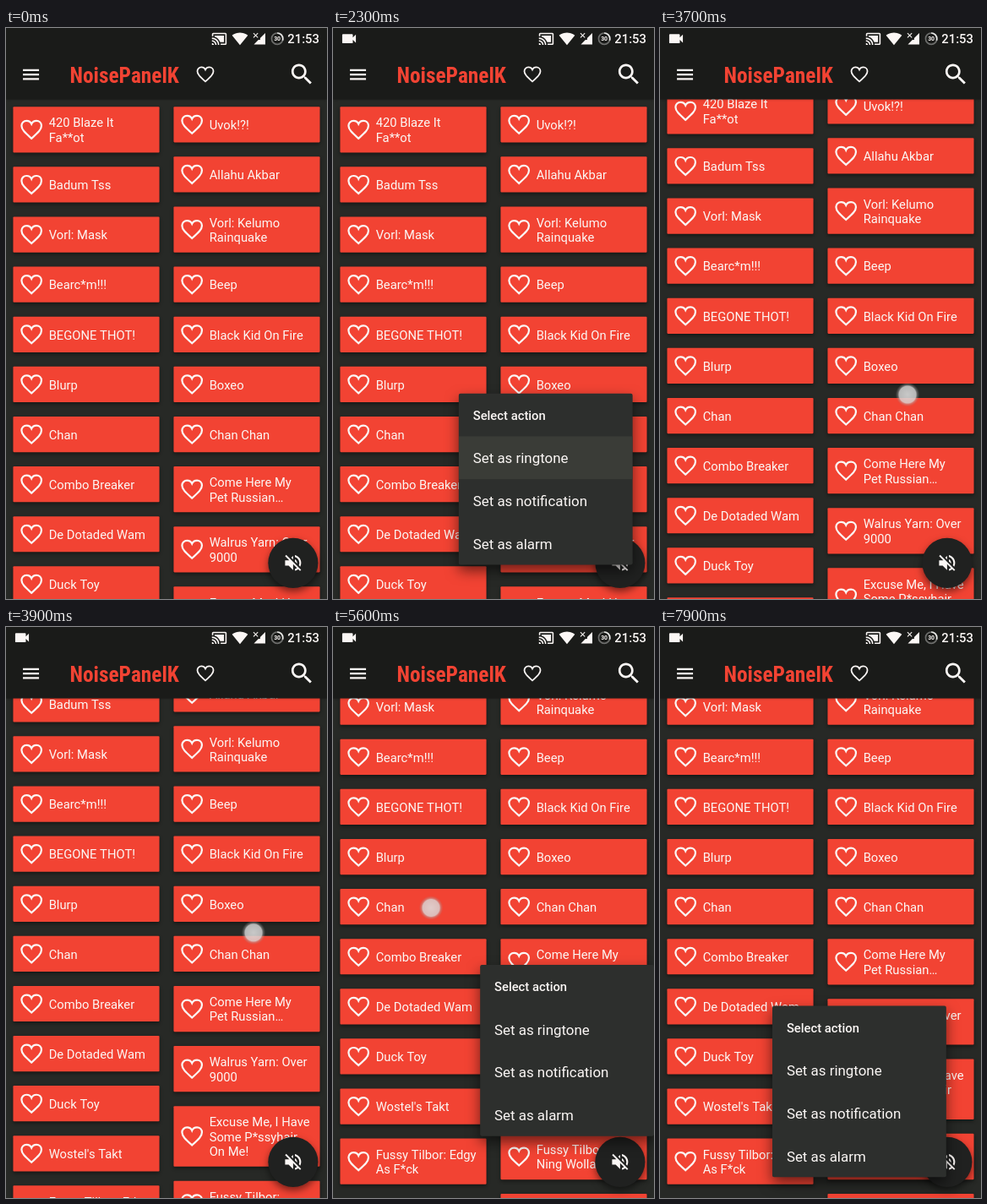
Animation of 380 by 676 pixels, one loop 8 s. Source, as an HTML page with a canvas:

```html
<!DOCTYPE html>
<html lang="en">
<head>
<meta charset="utf-8">
<title>Sound board</title>
<style>
  html, body { margin: 0; width: 100%; height: 100%; overflow: hidden; background: #272926; }
  canvas { display: block; width: 380px; height: 676px; }
</style>
</head>
<body>
<canvas id="stage"></canvas>
<script>
const LOOP = 8000, STEP = 100;
const UNIT = 380 / 360; // the layout is 360 units wide
const canvas = document.getElementById('stage');
const ctx = canvas.getContext('2d');
const ratio = window.devicePixelRatio || 1;
canvas.width = 380 * ratio;
canvas.height = 676 * ratio;

const SANS = 'Roboto, "Noto Sans", sans-serif';
const RED = '#f24333', WHITE = '#fbf7f5', BAR = '#1a1b19', PAGE = '#272926';
const MENU = '#2d2f2d', MENU_PRESSED = '#3a3c37';

// Icons on a 24 x 24 grid
const ICON = {
  heart: 'M12 20C6 14.6 3 11.9 3 8.5 3 5.9 5 4 7.5 4 9.3 4 11.2 5 12 6.8 12.8 5 14.7 4 16.5 4 19 4 21 5.9 21 8.5 21 11.9 18 14.6 12 20z',
  bars: 'M3 18h18v-2H3zm0-5h18v-2H3zm0-7v2h18V6z',
  search: 'M15.5 14h-.79l-.28-.27C15.41 12.59 16 11.11 16 9.5 16 5.91 13.09 3 9.5 3S3 5.91 3 9.5 5.91 16 9.5 16c1.61 0 3.09-.59 4.23-1.57l.27.28v.79l5 4.99L20.49 19zm-6 0C7.01 14 5 11.99 5 9.5S7.01 5 9.5 5 14 7.01 14 9.5 11.99 14 9.5 14z',
  mute: 'M16.5 12c0-1.77-1.02-3.29-2.5-4.03v2.21l2.45 2.45c.03-.2.05-.41.05-.63zm2.5 0c0 .94-.2 1.82-.54 2.64l1.51 1.51C20.63 14.91 21 13.5 21 12c0-4.28-2.99-7.86-7-8.77v2.06c2.89.86 5 3.54 5 6.71zM4.27 3L3 4.27 7.73 9H3v6h4l5 5v-6.73l4.25 4.25c-.67.52-1.42.93-2.25 1.18v2.06c1.38-.31 2.63-.95 3.69-1.81L19.73 21 21 19.73l-9-9zM12 4L9.91 6.09 12 8.18z',
  cast: 'M21 3H3c-1.1 0-2 .9-2 2v3h2V5h18v14h-7v2h7c1.1 0 2-.9 2-2V5c0-1.1-.9-2-2-2zM1 18v3h3c0-1.66-1.34-3-3-3zm0-4v2c2.76 0 5 2.24 5 5h2c0-3.87-3.13-7-7-7zm0-4v2c4.97 0 9 4.03 9 9h2c0-6.08-4.93-11-11-11zM19 7H5v1.63c3.96 1.28 7.09 4.41 8.37 8.37H19z',
  wifi: 'M12 21.5L23.64 7c-.45-.34-4.93-4-11.64-4C5.28 3 .81 6.66.36 7z',
  signal: 'M2 22h20V2L13 11v3H10z',
  camera: 'M17 10.5V7c0-.55-.45-1-1-1H4c-.55 0-1 .45-1 1v10c0 .55.45 1 1 1h12c.55 0 1-.45 1-1v-3.5l4 4v-11z'
};
for (const name in ICON) ICON[name] = new Path2D(ICON[name]);

const COLUMNS = [
  { x: 8, sounds: ['420 Blaze It\nFa**ot', 'Badum Tss', 'Vorl: Mask', 'Bearc*m!!!', 'BEGONE THOT!', 'Blurp', 'Chan',
    'Combo Breaker', 'De Dotaded Wam', 'Duck Toy', "Wostel's Takt", 'Fussy Tilbor: Edgy\nAs F*ck'] },
  { x: 188, sounds: ['Uvok!?!', 'Allahu Akbar', 'Vorl: Kelumo\nRainquake', 'Beep', 'Black Kid On Fire', 'Boxeo', 'Chan Chan',
    'Come Here My\nPet Russian…', 'Walrus Yarn: Over\n9000', 'Excuse Me, I Have\nSome P*ssyhair\nOn Me!',
    'Fussy Tilbor:\nNing Wollam', 'Gong'] }
];

// Context menus grow out of the finger position (fx, fy)
const MENU_W = 195, MENU_H = 192, ROW = 48;
const MENUS = [
  { open: 1032, close: 2800, x: 141, y: 410, fx: 141, fy: 410, pressAt: 1900 },
  { open: 4678, close: 5900, x: 165, y: 379, fx: 293.7, fy: 379 },
  { open: 7230, close: 9000, x: 126, y: 425, fx: 126, fy: 425 }
];
const TOUCHES = [
  { from: 500, to: 1700, x: 141, y: 410 },
  { from: 2000, to: 2300, x: 215, y: 484 },
  { from: 3600, to: 4150, x: 277.6, y: 432, drags: true },
  { from: 4200, to: 5300, x: 293.7, y: 379 },
  { from: 5600, to: 5900, x: 110, y: 315 },
  { from: 6800, to: 7900, x: 126, y: 425 }
];

const clamp = v => Math.max(0, Math.min(1, v));
const mix = (a, b, k) => a + (b - a) * k;
const smooth = v => v * v * (3 - 2 * v);

// cubic-bezier(x1, 0, .2, 1)
function settle(u, x1) {
  let low = 0, high = 1, s = u;
  for (let i = 0; i < 20; i++) {
    s = (low + high) / 2;
    const x = 3 * x1 * s * (1 - s) ** 2 + 0.6 * s * s * (1 - s) + s ** 3;
    if (x < u) low = s; else high = s;
  }
  return smooth(s);
}

function icon(name, x, y, scale = 1) {
  ctx.save();
  ctx.translate(x, y);
  ctx.scale(scale, scale);
  ctx.translate(-12, -12);
  if (name === 'heart') {
    ctx.lineWidth = 1.7;
    ctx.strokeStyle = WHITE;
    ctx.stroke(ICON.heart);
  } else {
    ctx.fillStyle = WHITE;
    ctx.fill(ICON[name]);
  }
  ctx.restore();
}

// Text whose padded line box is centred on y
function text(label, x, y, size, { weight = '400', color = WHITE, family = SANS, align = 'left' } = {}) {
  ctx.font = `${weight} ${size}px ${family}`;
  ctx.fillStyle = color;
  ctx.textAlign = align;
  ctx.fillText(label, x, y + size * 0.392);
}

function shadowed(blur, drop, alpha, color, trace) {
  ctx.save();
  ctx.shadowColor = `rgba(0,0,0,${alpha})`;
  ctx.shadowBlur = blur * ratio;
  ctx.shadowOffsetY = drop * ratio;
  ctx.fillStyle = color;
  ctx.beginPath();
  trace();
  ctx.fill();
  ctx.restore();
}

function drawCards(scroll) {
  for (const { x, sounds } of COLUMNS) {
    let y = 88.3 - scroll;
    for (const sound of sounds) {
      const lines = sound.split('\n');
      const height = Math.max(40, 18.6 + 16.4 * lines.length);
      const middle = y + height / 2;
      shadowed(4, 2, 0.45, RED, () => ctx.roundRect(x, y, 164, height, 1));
      icon('heart', x + 20.6, middle, 1.24);
      lines.forEach((line, i) =>
        text(line, x + 40, middle + (i - (lines.length - 1) / 2) * 16.4, 14));
      y += height + 16;
    }
  }
}

function drawBars(t) {
  shadowed(3, 1, 0.3, BAR, () => ctx.rect(0, 0, 360, 80));
  if (t >= 100) icon('camera', 18, 12, 0.85);
  icon('cast', 239.2, 12.2, 0.75);
  icon('wifi', 262.4, 12, 0.76);
  icon('signal', 284.4, 12, 0.64);
  ctx.lineWidth = 1;
  ctx.strokeStyle = WHITE;
  ctx.beginPath();
  ctx.moveTo(277.5, 5.7); ctx.lineTo(282.5, 10.7);
  ctx.moveTo(282.5, 5.7); ctx.lineTo(277.5, 10.7);
  ctx.stroke();

  ctx.lineWidth = 1.6;
  for (const [color, sweep] of [['#6d6e6c', 1], ['#e6e6e4', 0.3]]) {
    ctx.strokeStyle = color;
    ctx.beginPath();
    ctx.arc(304.2, 12, 6.3, -Math.PI / 2, Math.PI * (2 * sweep - 0.5));
    ctx.stroke();
  }
  text('30', 304.2, 11.7, 6.5, { weight: '700', align: 'center' });
  text('21:53', 315.8, 11.7, 14, { weight: '500' });

  icon('bars', 28, 52.2);
  text('NoisePanelK', 71.5, 52, 24,
    { weight: 'bold condensed', color: RED, family: '"Roboto Condensed", Roboto, sans-serif' });
  icon('heart', 223.6, 52);
  icon('search', 331.8, 52, 1.3);
}

function drawMuteButton() {
  shadowed(9, 4, 0.5, '#202120', () => ctx.arc(322, 600, 28, 0, 7));
  icon('mute', 322, 600);
}

function drawMenu(menu, t) {
  if (t < menu.open || t >= menu.close) return;
  const u = clamp((t - menu.open) / 170);
  const kx = settle(u, 0), ky = settle(u, 0.4);
  const cx = mix(menu.fx, menu.x + MENU_W / 2, kx);
  const cy = mix(menu.fy, menu.y + MENU_H / 2, ky);
  const w = mix(48, MENU_W, kx), h = mix(48, MENU_H, ky);
  const left = cx - MENU_W / 2, top = cy - MENU_H / 2;
  const trace = () => ctx.roundRect(cx - w / 2, cy - h / 2, w, h, 2);

  ctx.save();
  ctx.globalAlpha = Math.min(1, u * 2.5, (menu.close - t) / 200);
  shadowed(16, 7, 0.55, MENU, trace);
  ctx.beginPath();
  trace();
  ctx.clip();
  if (t > menu.pressAt) {
    ctx.save();
    ctx.globalAlpha *= clamp((t - menu.pressAt) / 400);
    ctx.fillStyle = MENU_PRESSED;
    ctx.fillRect(left, top + ROW, MENU_W, ROW);
    ctx.restore();
  }
  text('Select action', left + 16, top + ROW / 2, 14, { weight: '500' });
  ['ringtone', 'notification', 'alarm'].forEach((kind, i) =>
    text('Set as ' + kind, left + 16, top + ROW * (i + 1.5), 16));
  ctx.restore();
}

function drawTouch({ from, to, x, y, drags }, t, scroll) {
  if (t < from || t >= to) return;
  if (drags) y -= scroll;
  const radius = 13.5;
  const glow = ctx.createRadialGradient(x, y, 0, x, y, radius);
  glow.addColorStop(0, 'rgba(222,222,222,.88)');
  glow.addColorStop(0.7, 'rgba(215,215,215,.82)');
  glow.addColorStop(0.8, 'rgba(185,185,185,.4)');
  glow.addColorStop(1, 'rgba(140,140,140,0)');
  ctx.save();
  ctx.globalAlpha = clamp((to - t) / 250);
  ctx.fillStyle = glow;
  ctx.fillRect(x - radius, y - radius, 2 * radius, 2 * radius);
  ctx.restore();
}

function draw(t) {
  const scroll = 142 * smooth(clamp((t - 3560) / 580));
  ctx.setTransform(UNIT * ratio, 0, 0, UNIT * ratio, 0, 0);
  ctx.fillStyle = PAGE;
  ctx.fillRect(0, 0, 360, 641);
  drawCards(scroll);
  drawBars(t);
  drawMuteButton();
  for (const menu of MENUS) drawMenu(menu, t);
  for (const touch of TOUCHES) drawTouch(touch, t, scroll);
}

// The screen refreshes ten times a second
function tick() {
  draw(Math.floor(performance.now() % LOOP / STEP) * STEP);
  requestAnimationFrame(tick);
}
tick();
</script>
</body>
</html>
```
